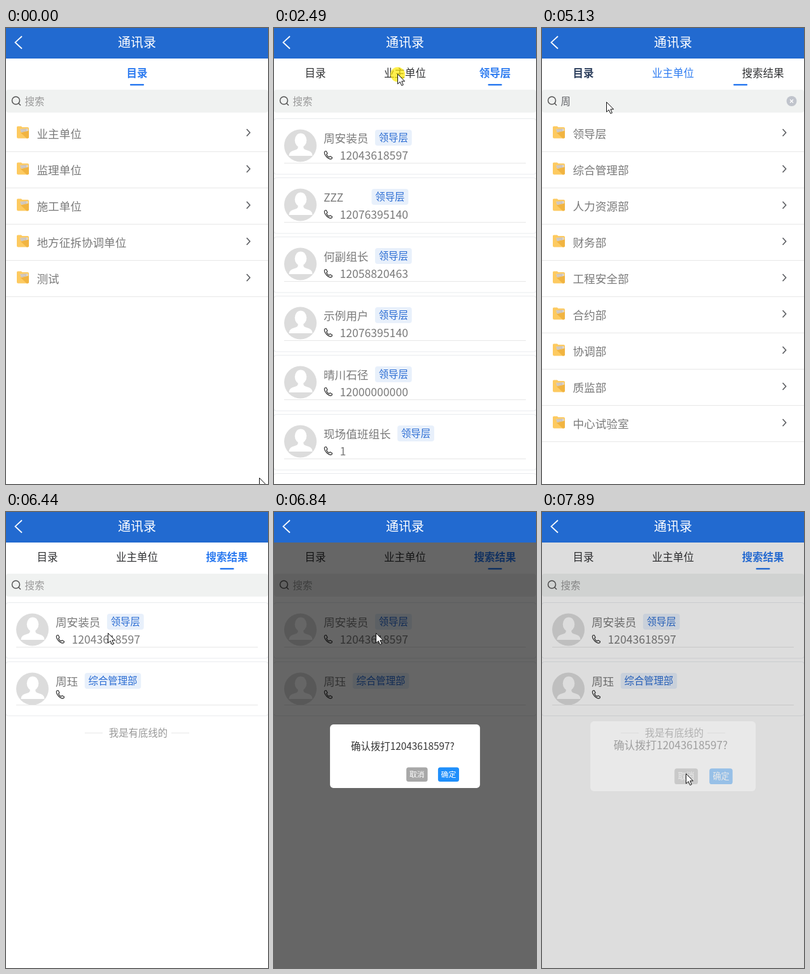
Write an HTML page that moves like this. It is 412 px wide and 717 px high and loops after 8 s.

```html
<!DOCTYPE html>
<html lang="zh-CN">
<head>
<meta charset="utf-8">
<title>通讯录</title>
<style>
  html, body { margin: 0; width: 100%; height: 100%; overflow: hidden; background: #fff; }
  svg { display: block; width: 100%; height: 100%; }
  text { font-family: "Noto Sans CJK SC", "Noto Sans CJK", "Noto Sans", sans-serif; white-space: pre; }
</style>
</head>
<body>
<svg id="stage" viewBox="0 0 412 717"></svg>
<script>
const BLUE = '#2b7af0', DARK = '#303133', GRAY = '#7a7a7a';
const LOOP = 8000;

// Text placed by the visual middle of its line.
const label = (x, middle, size, fill, content, extra = '') =>
  `<text x="${x}" y="${middle + size * 0.38}" font-size="${size}" fill="${fill}" ${extra}>${content}</text>`;
const box = (x, y, w, h, fill, r = 0, extra = '') =>
  `<rect x="${x}" y="${y}" width="${w}" height="${h}" rx="${r}" fill="${fill}" ${extra}/>`;
const rule = (x1, x2, y, color = '#e7e7e7') =>
  `<path d="M${x1} ${y}H${x2}" stroke="${color}"/>`;
const CENTER = 'text-anchor="middle"';

const defs = `<defs>
  <g id="folder">
    <path d="M0 2Q0 .5 1.5 .5H7L8.5 2H17Q19 2 19 4V17.5Q19 19.5 17 19.5H2Q0 19.5 0 17.5Z" fill="#fdca60"/>
    <path d="M5 5 17 4 18 8.5 7 10.5Z" fill="#ded8d2"/>
    <path d="M5.5 6.3 15.5 5.2M6.5 8.7 15 7.4" stroke="#b9aea6" stroke-width=".9"/>
    <path d="M6 10.5 19 7.5V17.5Q19 19.5 17 19.5H15.5Z" fill="#f1b441"/>
  </g>
  <path id="chevron" d="M0 0 5 5.5 0 11" fill="none" stroke="#606266" stroke-width="1.7"/>
  <g id="avatar">
    <circle r="25.5" fill="#dcdcdc"/>
    <ellipse cx=".5" cy="-8.5" rx="9.3" ry="11" fill="#fff"/>
    <path d="M-18 16Q-18 10.500-13 8.500L-6 6Q-3 4.500-4 0H5Q4 4.500 7 6L14 8.500Q19 10.500 19 16Z" fill="#fff"/>
  </g>
  <path id="handset" d="M1.500 1 3.500.5 5.500 4 4 5.800Q5 8.500 8 10L9.800 8.700 13 10.500 12.400 12.600Q11 13.600 8.500 12.600 3 10 1 4.500 .3 2 1.500 1Z"
    fill="none" stroke="#333" stroke-width="1.2" stroke-linejoin="round"/>
  <clipPath id="cardArea">${box(0, 133, 412, 569, '#fff')}</clipPath>
</defs>`;

const folderList = names => names.map((name, i) => {
  const y = 57 * i;
  return `<use href="#folder" x="17" y="${154 + y}"/>` +
    label(48.5, 166.5 + y, 17.6, GRAY, name) +
    `<use href="#chevron" x="378.500" y="${159 + y}"/>` + rule(0, 412, 194.5 + y);
}).join('');

function card({ name, team = '领导层', phone = '', badgeX }, i) {
  const top = 142.5 + 93 * i, short = phone ? 0 : 6;
  const bx = badgeX || 88.5 + 17.6 * name.length;
  return box(-0.5, top, 413, phone ? 87.5 : 85, '#fff', 4, 'stroke="#e9ebee"') +
    `<use href="#avatar" x="41.500" y="${top + 42.5}"/>` +
    label(78, top + 31, 17.6, GRAY, name) +
    box(bx, top + 17.5, 11.6 + 15.4 * team.length, 25, '#e8f0fb', 4) +
    label(bx + 5.8, top + 30, 15.4, '#2a6cd3', team) +
    `<use href="#handset" x="78.500" y="${top + 50.5 - short}"/>` +
    label(103.5, top + 58, 17.6, GRAY, phone) +
    rule(16, 396, top + (phone ? 70 : 68));
}

const installer = { name: '周安装员', phone: '12043618597' };
const leaders = [
  installer,
  { name: 'ZZZ', phone: '12076395140', badgeX: 153.5 },
  { name: '何副组长', phone: '12058820463' },
  { name: '示例用户', phone: '12076395140' },
  { name: '晴川石径', phone: '12000000000' },
  { name: '现场值班组长', phone: '1' },
  { name: '示例用户', phone: '12076395140' }
];
const found = [installer, { name: '周珏', team: '综合管理部' }];

const pages = {
  root: folderList(['业主单位', '监理单位', '施工单位', '地方征拆协调单位', '测试']),
  owner: folderList(['领导层', '综合管理部', '人力资源部', '财务部', '工程安全部', '合约部', '协调部', '质监部', '中心试验室']),
  leaders: `<g clip-path="url(#cardArea)">${leaders.map(card).join('')}</g>`,
  results: found.map(card).join('') + rule(124, 152, 347.5) + rule(260, 288, 347.5) +
    label(208, 347.5, 15.4, '#999', '我是有底线的', CENTER)
};

const header = box(0, 0, 412, 48, '#226ad0') +
  '<path d="M25 13 14.500 22.700 25 32.500" fill="none" stroke="#fff" stroke-width="1.800"/>' +
  label(206, 22, 20, '#fff', '通讯录', CENTER);

const search = box(0, 97, 412, 36, '#f0f2f1', 4) +
  '<path d="M21.500 114A6 6 0 1 1 9.500 114 6 6 0 1 1 21.500 114M19.700 118.300 23 121.700" fill="none" stroke="#555" stroke-width="1.500"/>' +
  label(29.5, 115, 15.4, '#999', '', 'id="query"') +
  box(29.5, 105, 1.2, 20, '#333', 0, 'id="caret"') +
  `<g id="clear"><circle cx="392.500" cy="115" r="8" fill="#c0c4cc"/>
   <path d="M390 112.500l5 5m0-5l-5 5" stroke="#fff" stroke-width="1.300"/></g>`;

const candidates = `<g id="candidates">${box(136.5, 195.5, 290, 69, '#fff', 3, 'stroke="#d8d8d8"')}
  ${label(148, 213, 15, '#333', '', 'id="pinyin"')}${rule(137, 412, 229.5)}
  ${label(148, 247, 16, '#333', '1.周  2.州  3.粥  4.洲  5.舟')}</g>`;

const dialog = `<g id="dialog">${box(-134, -56.7, 268, 113.4, '#fff', 6)}
  ${label(-96.5, -18.4, 17.5, '#333', `确认拨打${installer.phone}?`)}
  ${box(2.4, 19.8, 38, 25.6, '#a8a8a8', 4)}${label(21.4, 32.4, 13.5, '#fff', '取消', CENTER)}
  ${box(59, 19.8, 37.6, 25.6, '#1f8ffb', 4)}${label(77.8, 32.4, 13.5, '#fff', '确定', CENTER)}</g>`;

const pointer = `<g id="pointer"><circle id="press" cx=".5" cy="1" r="11.500" fill="#ffe800" opacity=".7"/>
  <path d="M.5 .5V16L4.200 12.700 6.800 18.500 9.300 17.400 6.800 11.800H11.600Z" fill="#fff" stroke="#111"/></g>`;

const stage = document.getElementById('stage');
stage.innerHTML = defs + header + '<g id="tabs"></g>' + box(0, 88, 22, 2.4, BLUE, 1, 'id="ink"') + search +
  Object.entries(pages).map(([id, body]) => `<g id="${id}">${body}</g>`).join('') +
  candidates + box(0, 48, 412, 669, '#000', 0, 'id="shade"') + dialog + pointer;

const el = id => document.getElementById(id);
const show = (id, on) => el(id).setAttribute('display', on ? 'inline' : 'none');

const tabCenters = [[], [206], [100, 312], [65, 206, 347.5]];
const tabStyles = {
  n: [DARK, 400],
  c: [BLUE, 400],
  b: [BLUE, 700],
  d: ['#2c3e5c', 700]
};

const initial = {
  page: 'root', tabs: ['目录'], look: 'b', ink: 206, at: [398, 707], press: false,
  query: '', caret: false, pinyin: '', shade: 0, scale: 1, alpha: 0
};
const ownerTabs = ['目录', '业主单位'];
const leaderTabs = [...ownerTabs, '领导层'];
const resultTabs = [...ownerTabs, '搜索结果'];

// Each step changes part of the state from its time on.
const steps = [
  [0, {}],
  [140, { at: [205, 400] }],
  [270, { at: [72, 170] }],
  [670, { press: true }],
  [800, { press: false, page: 'owner', tabs: ownerTabs, look: 'dn' }],
  [930, { ink: 290, look: 'nc' }],
  [1060, { ink: 312, look: 'nb', press: true }],
  [1190, { press: false }],
  [1320, { page: 'leaders', tabs: leaderTabs, look: 'dcn' }],
  [1450, { ink: 338, look: 'nnc' }],
  [1580, { ink: 347.5, look: 'nnb' }],
  [1710, { at: [80, 163] }],
  [1840, { at: [106, 143] }],
  [1970, { at: [139, 115] }],
  [2100, { at: [170, 91] }],
  [2230, { at: [189, 76] }],
  [2360, { at: [194, 72] }],
  [2490, { press: true }],
  [2620, { press: false, page: 'owner', tabs: ownerTabs, look: 'nn' }],
  [2750, { ink: 326, look: 'nc' }],
  [2880, { ink: 312 }],
  [3020, { look: 'nb', at: [165, 85] }],
  [3150, { at: [116, 109] }],
  [3280, { at: [101, 116], caret: true }],
  [3680, { caret: false }],
  [4070, { pinyin: 'z' }],
  [4200, { pinyin: 'zhou' }],
  [4600, { pinyin: '', query: '周', caret: true }],
  [4730, { caret: false }],
  [5000, { tabs: resultTabs, look: 'dbn' }],
  [5130, { look: 'dcn' }],
  [5260, { page: 'results', query: '', ink: 326, look: 'nnc' }],
  [5390, { ink: 342 }],
  [5520, { ink: 347.5, look: 'nnb' }],
  [5650, { at: [114, 118] }],
  [5780, { at: [131, 122] }],
  [5920, { at: [139, 131] }],
  [6050, { at: [148, 147] }],
  [6180, { at: [155, 167] }],
  [6310, { at: [159, 183] }],
  [6440, { at: [160, 190] }],
  [6700, { shade: 0.25, scale: 0.76, alpha: 0.45 }],
  [6840, { shade: 0.6, scale: 0.88, alpha: 1 }],
  [6970, { scale: 1 }],
  [7240, { at: [167, 220] }],
  [7370, { at: [189, 305] }],
  [7500, { at: [217, 391] }],
  [7630, { at: [226, 411] }],
  [7760, { press: true }],
  [7890, { press: false, shade: 0.135, scale: 0.97, alpha: 0.36 }]
];

let state = initial;
const timeline = steps.map(([time, change]) => ({ time, state: state = { ...state, ...change } }));

function draw(s) {
  for (const id in pages) show(id, id === s.page);
  el('tabs').innerHTML = s.tabs.map((name, i) => {
    const [color, weight] = tabStyles[s.look[i]];
    return label(tabCenters[s.tabs.length][i], 71, 16.5, color, name, `${CENTER} font-weight="${weight}"`);
  }).join('');
  el('ink').setAttribute('x', s.ink - 11);

  el('query').textContent = s.query || '搜索';
  el('query').setAttribute('fill', s.query ? '#606266' : '#999');
  el('caret').setAttribute('x', s.query ? 45.5 : 29.5);
  show('caret', s.caret);
  show('clear', s.query);
  show('candidates', s.pinyin);
  el('pinyin').textContent = s.pinyin;

  el('shade').setAttribute('opacity', s.shade);
  el('dialog').setAttribute('opacity', s.alpha);
  el('dialog').setAttribute('transform', `translate(206 384) scale(${s.scale})`);
  el('pointer').setAttribute('transform', `translate(${s.at})`);
  show('press', s.press);
}

const start = performance.now();
let shown;
function tick() {
  const t = (performance.now() - start) % LOOP;
  const current = timeline.findLast(step => step.time <= t);
  if (current !== shown) draw((shown = current).state);
  requestAnimationFrame(tick);
}
tick();
</script>
</body>
</html>
```
